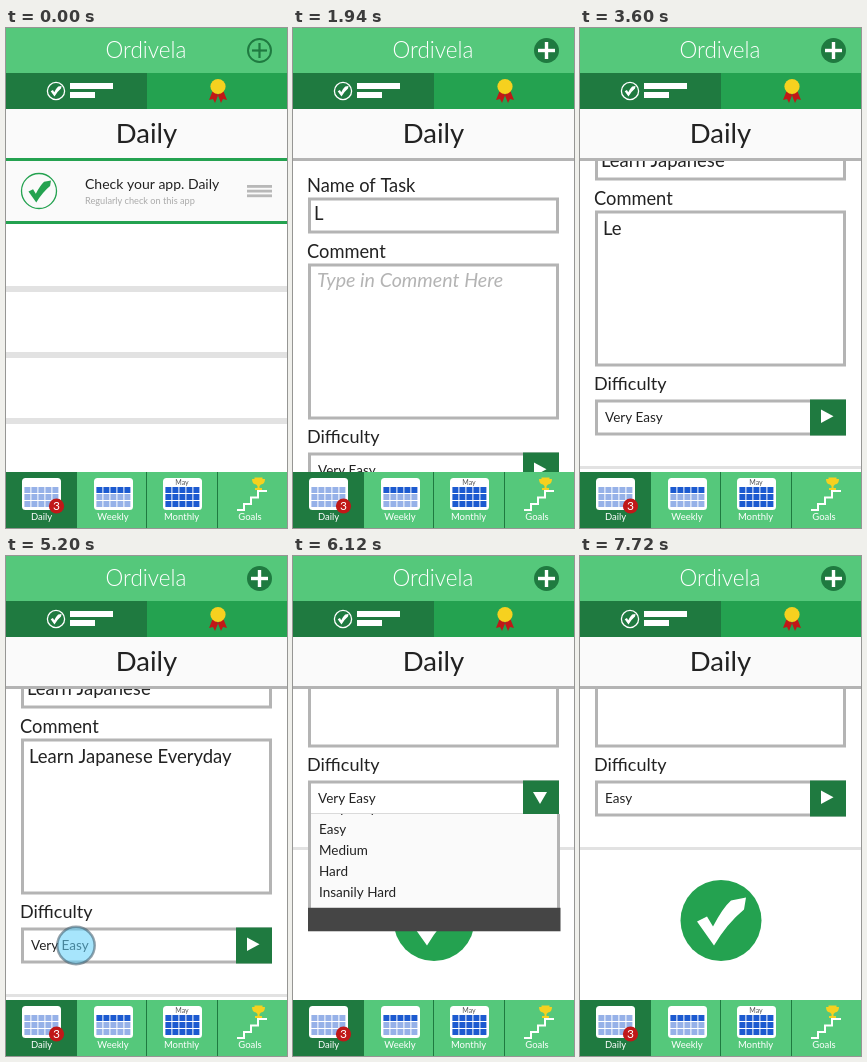
These frames come from a looping animation (281x500 px, 8 s). An HTML page with a canvas:

```html
<!DOCTYPE html>
<html lang="en">
<head>
<meta charset="utf-8">
<title>Task app</title>
<style>
html, body { margin: 0; width: 100%; height: 100%; overflow: hidden; background: #fff; }
canvas { display: block; }
</style>
</head>
<body>
<canvas id="stage" width="281" height="500"></canvas>
<script>
const W = 281, H = 500, LOOP = 8000;
const DARK = '#1f7a40', MID = '#24a250', LIGHT = '#55c87b', GREY = '#b4b4b4', PALE = '#e2e2e2', INK = '#222';
const screen = document.getElementById('stage').getContext('2d');
const buffer = document.createElement('canvas');
buffer.width = W;
buffer.height = H;
const layer = buffer.getContext('2d');
let c = screen;

// progress from a to b, eased at both ends
const ease = (t, a, b) => {
  const p = Math.min(1, Math.max(0, (t - a) / (b - a)));
  return p * p * (3 - 2 * p);
};
const typed = (s, t, start, step) => t < start ? '' : s.slice(0, 1 + Math.floor((t - start) / step));
const scrollAt = t => 53 * ease(t, 3000, 3300) + 147 * ease(t, 5560, 5960);

function rect(x, y, w, h, fill) {
  c.fillStyle = fill;
  c.fillRect(x, y, w, h);
}
function text(s, x, y, size, fill = INK, align = 'left', style = '') {
  c.font = `${style} ${size}px Lato, "Open Sans", sans-serif`;
  c.textAlign = align;
  c.fillStyle = fill;
  c.fillText(s, x, y);
}
function circle(x, y, r, fill, stroke, width) {
  c.beginPath();
  c.arc(x, y, r, 0, 7);
  if (fill) { c.fillStyle = fill; c.fill(); }
  if (stroke) { c.strokeStyle = stroke; c.lineWidth = width; c.stroke(); }
}
function shape(d, fill, x = 0, y = 0, scale = 1) {
  c.save();
  c.translate(x, y);
  c.scale(scale, scale);
  c.fillStyle = fill;
  c.fill(new Path2D(d));
  c.restore();
}
function field(y, h) {
  c.strokeStyle = GREY;
  c.lineWidth = 3;
  c.strokeRect(16.5, y + 1.5, 248, h - 3);
}
const check = (x, y, scale, fill) =>
  shape('M-24 1L-14 -4L-8 6Q2 -13 10 -20L25 -23L23 -11Q6 3 -7 25Z', fill, x, y, scale);

function plus(size, width, color) {
  rect(253.5 - size / 2, 22.5 - width / 2, size, width, color);
  rect(253.5 - width / 2, 22.5 - size / 2, width, size, color);
}

function header(t) {
  rect(0, 0, W, 45, LIGHT);
  text('Ordivela', 140, 30, 22.5, '#fff', 'center', '300');
  c.globalAlpha = 1 - ease(t, 720, 1100);
  circle(253.5, 22.5, 11.5, null, DARK, 2);
  plus(15, 2.2, DARK);
  c.globalAlpha = ease(t, 1240, 1600);
  circle(253.5, 22.5, 12.5, DARK);
  plus(17, 3.4, '#fff');
  c.globalAlpha = 1;

  rect(0, 45, 141, 36, DARK);
  rect(141, 45, 140, 36, MID);
  circle(50, 63, 8.6, null, '#fff', 1.3);
  check(50, 63, 0.22, '#fff');
  rect(64, 55, 43, 6, '#fff');
  rect(64, 64, 25, 6, '#fff');
  shape('M207 62L203 72L207 71L209 75L213 65ZM217 62L221 72L217 71L215 75L211 65Z', '#c01818');
  circle(212, 58.5, 7.6, '#f6d11f');

  rect(0, 81, W, 49, '#fafafa');
  text('Daily', 140.5, 115, 27.5, INK, 'center');
}

function calendar(x, darkRows) {
  c.beginPath();
  c.roundRect(x, 450, 39, 32, 3.5);
  c.fillStyle = '#fff';
  c.fill();
  for (let row = 0; row < 3; row++)
    for (let col = 0; col < 5; col++)
      rect(x + 2.4 + col * 7, 459 + row * 7, 6, 6, row < darkRows ? '#1c5ad0' : '#96b1e8');
}

function footer() {
  rect(0, 444, W, 56, LIGHT);
  rect(0, 444, 70, 56, DARK);
  for (const x of [70, 140, 211]) rect(x, 444, 1, 56, DARK);
  calendar(16, 0);
  calendar(88, 1);
  calendar(157, 3);
  text('May', 176, 456.5, 7, '#555', 'center');
  circle(50.5, 478, 7.6, '#c01818');
  text('3', 50.5, 482.2, 12, '#fff', 'center');
  c.strokeStyle = '#fff';
  c.lineWidth = 2;
  c.stroke(new Path2D('M231 482h7v-6h7v-6.5h7v-6.5h9'));
  shape('M248.500 449.500h8v1.500h2.500q0 5 -4 5.500l-1.500 1.500v2h2.500v2h-7v-2h2.500v-2l-1.500 -1.500q-4 -.5 -4 -5.500h2.500z', '#f6d11f');
  ['Daily', 'Weekly', 'Monthly', 'Goals'].forEach((s, i) =>
    text(s, [35.5, 107, 175.5, 244][i], 492, 9.5, '#fff', 'center'));
}

function dropdown(open) {
  if (!open) return;
  c.save();
  c.beginPath();
  c.rect(0, 458, W, 140);
  c.clip();
  c.translate(0, -139 * (1 - open));
  rect(15, 458, 252, 118, GREY);
  rect(18, 460, 246, 114, '#fafafa');
  ['Very Easy', 'Easy', 'Medium', 'Hard', 'Insanily Hard'].forEach((s, i) =>
    text(s, 26, 478.7 + i * 20.9, 13.5));
  rect(15, 573, 252.5, 23.5, '#454545');
  c.restore();
}

// the parts of the form that blur while scrolling
function form(t, tm) {
  c.save();
  c.translate(0, -scrollAt(tm));
  text('Name of Task', 14, 163.5, 18.3);
  field(169.5, 36);
  text(typed('Learn Japanese', t, 1940, 58.4), 21, 192, 18.5);
  text('Comment', 14, 229.5, 18.3);
  field(235.5, 156);
  const comment = typed('Learn Japanese Everyday', t, 3520, 61);
  if (comment) text(comment, 23, 259.5, 18.5);
  else text('Type in Comment Here', 24, 259, 19.7, GREY, 'left', 'italic');
  text('Difficulty', 14, 415, 18);
  field(424.5, 36);
  rect(230, 424.5, 36, 36, DARK);
  rect(0, 491, W, 3, PALE);
  c.restore();
}

// the parts that stay sharp
function controls(t) {
  c.save();
  c.beginPath();
  c.rect(0, 130, W, 314);
  c.clip();
  c.translate(0, -scrollAt(t));
  text(t < 6930 ? 'Very Easy' : 'Easy', 25, 447, 13.5);
  shape(t > 5560 && t < 7420 ? 'M240 436h14l-7 12z' : 'M241 434.5v13.5l12.5 -6.75z', '#fff');
  circle(141, 564.5, 40.5, MID);
  check(141, 564.5, 1, '#fff');
  dropdown(ease(t, 5880, 6200) - ease(t, 7400, 7720));
  c.restore();
  rect(0, 130, W, 3, GREY);
}

function list(tm) {
  const slide = ease(tm, 700, 1240);
  if (slide === 1) return;
  c.save();
  c.translate(-W * slide, 0);
  rect(0, 130, W, 314, '#fff');
  rect(0, 133, W, 60, '#fafafa');
  rect(0, 130, W, 3, MID);
  rect(0, 193, W, 3, MID);
  for (const y of [258, 324, 390]) rect(0, y, W, 6, PALE);
  circle(33, 163, 17.5, null, MID, 1.3);
  check(33.5, 163, 0.46, MID);
  text('Check your app. Daily', 79, 160.5, 14);
  text('Regularly check on this app', 79, 176, 9.2, '#aaa');
  for (const y of [157, 161.7, 166.4]) rect(241, y, 25, 2.8, '#b8b8b8');
  c.restore();
}

// average several moments for motion blur
function content(t) {
  const n = 10, shutter = t < 2000 ? 18 : 10;
  for (let i = 0; i < n; i++) {
    const tm = t + ((i + 0.5) / n - 0.5) * shutter;
    c = layer;
    rect(0, 0, W, H, '#fff');
    form(t, tm);
    controls(t);
    list(tm);
    screen.globalAlpha = 1 / (i + 1);
    screen.drawImage(buffer, 0, 0);
  }
  screen.globalAlpha = 1;
  c = screen;
}

function tap(t, start, x, y) {
  const half = 270, u = t - start;
  if (u <= 0 || u >= 2 * half) return;
  const away = ease(Math.abs(u - half), 0, half);
  const scale = 1 + 0.93 * away;
  c.globalAlpha = 1 - away;
  circle(x, y, 14.2 * scale, 'rgba(98,208,250,.85)', 'rgba(55,80,95,.8)', 1.9 * scale);
  c.globalAlpha = 1;
}

function draw() {
  const t = performance.now() % LOOP;
  content(t);
  header(t);
  footer();
  tap(t, 10, 253.5, 22.5);
  tap(t, 1265, 86, 188.5);
  tap(t, 2760, 139, 250);
  tap(t, 4825, 70, 389.5);
  tap(t, 6670, 43, 297);
  requestAnimationFrame(draw);
}
draw();
</script>
</body>
</html>
```
